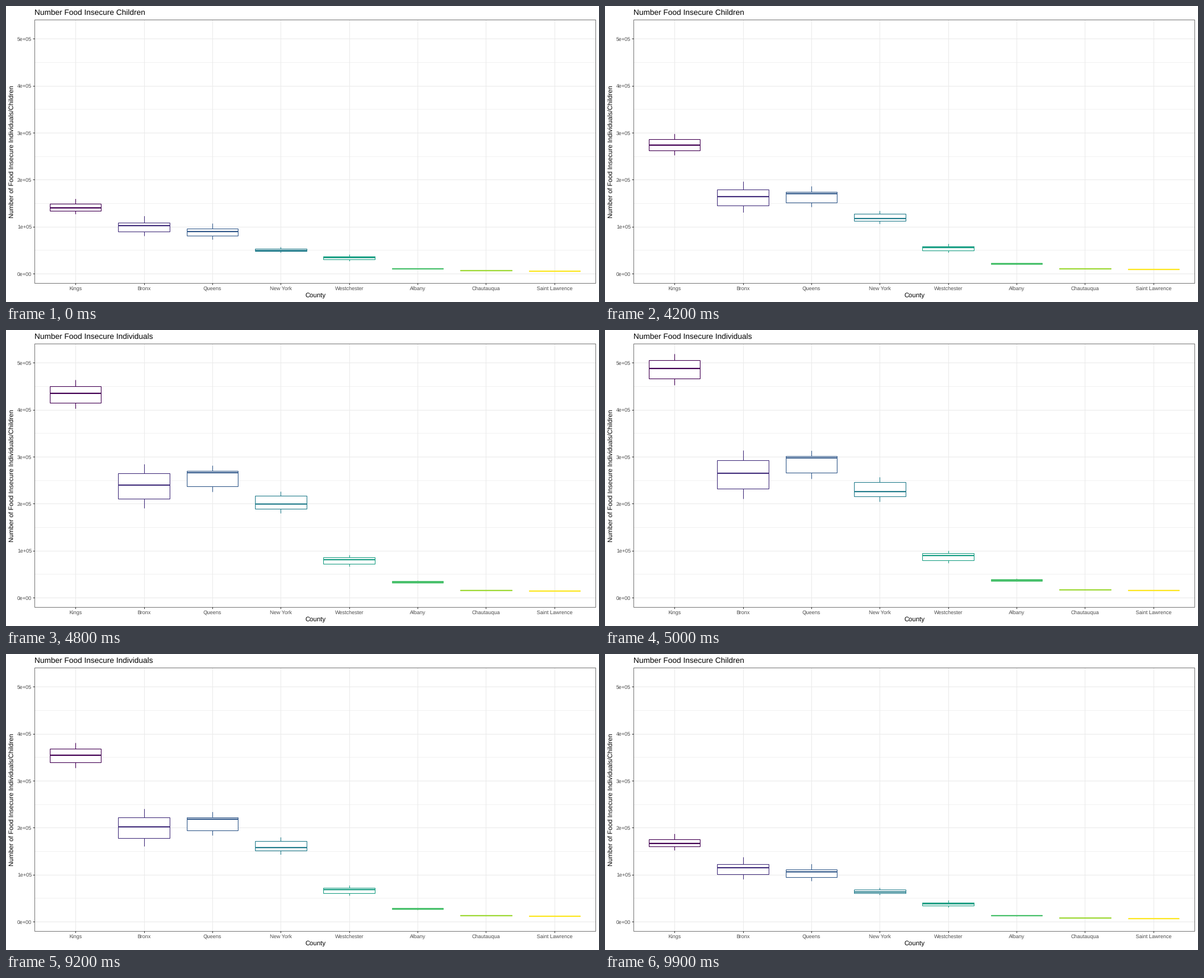
These frames come from a looping animation (1000x500 px, 10 s). A matplotlib script:

```python
import matplotlib.pyplot as plt
import numpy as np
from matplotlib.animation import FuncAnimation
from matplotlib.patches import Rectangle

WIDTH, HEIGHT, DPI = 1000, 500, 100
PX = 72 / DPI  # points per pixel
LEFT, RIGHT, TOP, BOTTOM = 48.4, 994.5, 23.5, 468.5
ZERO_Y, STEP_Y = 452.5, 79.35  # pixel row of 0 and pixels per 1e5
UNIT_X = (RIGHT - LEFT) / 8.2
BOX_HALF = 0.375 * UNIT_X
HOLD, MOVE = 38, 13  # still frames, then steps to the other state
FRAMES = 100
GRID, TICK, TICK_TEXT = "#EBEBEB", "#333333", "#4D4D4D"

# Median children and individuals in units of 1e5, then the box's
# relative reach below the median and above it for individuals
COUNTIES = {
    "Kings": (1.405, 4.883, 0.045, 0.035),
    "Bronx": (1.025, 2.649, 0.125, 0.104),
    "Queens": (0.902, 2.983, 0.110, 0.008),
    "New York": (0.500, 2.265, 0.050, 0.086),
    "Westchester": (0.342, 0.904, 0.125, 0.046),
    "Albany": (0.106, 0.374, 0.04, 0.06),
    "Chautauqua": (0.071, 0.173, 0.04, 0.04),
    "Saint Lawrence": (0.058, 0.158, 0.04, 0.04),
}
COLORS = [plt.cm.viridis(t) for t in np.linspace(0, 1, len(COUNTIES))]

plt.rcParams.update({"font.family": "Liberation Sans", "text.hinting": "none",
                     "path.snap": False})
fig = plt.figure(figsize=(WIDTH / DPI, HEIGHT / DPI), dpi=DPI, facecolor="white")
ax = fig.add_axes([0, 0, 1, 1])
ax.set(xlim=(0, WIDTH), ylim=(HEIGHT, 0))
ax.axis("off")


def row(value):
    return ZERO_Y - value * STEP_Y


def crisp(position):
    """Centre of the pixel that holds this position."""
    return np.floor(position) + 0.5


def summary(median, below, above, upper, lower):
    """Whisker top, box top, median, box bottom and whisker bottom."""
    q1, q3 = median * (1 - below), median * (1 + above)
    spread = q3 - q1
    return np.array([q3 + upper * spread, q3, median, q1, q1 - lower * spread])


def line(xs, ys, color, width, z):
    return ax.plot(xs, ys, color=color, lw=width * PX, zorder=z,
                   solid_capstyle="butt")[0]


def label(x, y, text, size, color="black", ha="center", **kwargs):
    return ax.text(x, y, text, size=size * PX, color=color, ha=ha,
                   va="baseline", **kwargs)


def outline(x0, x1, y0, y1, color, width, fill, z):
    return ax.add_patch(Rectangle((x0, y0), x1 - x0, y1 - y0, ec=color, fc=fill,
                                  lw=width * PX, joinstyle="miter", zorder=z))


for i in range(6):
    y = crisp(row(i))
    line([LEFT, RIGHT], [y, y], GRID, 1.07, 1)
    line([LEFT - 2.75, LEFT], [y, y], TICK, 1.07, 1)
    label(LEFT - 4.95, row(i) + 3.15, f"{i}e+0{5 if i else 0}", 8.8, TICK_TEXT, "right")
    if i < 5:
        line([LEFT, RIGHT], [crisp(row(i + 0.5))] * 2, GRID, 0.6, 1)

boxes = []
for i, (county, color) in enumerate(zip(COUNTIES, COLORS)):
    center = LEFT + UNIT_X * (0.6 + i)
    x, x0, x1 = crisp(np.array([center, center - BOX_HALF, center + BOX_HALF]))
    line([x, x], [TOP, BOTTOM], GRID, 1.07, 1)
    line([x, x], [BOTTOM, BOTTOM + 2.75], TICK, 1.07, 1)
    label(center, 479.7, county, 8.8, TICK_TEXT)

    whiskers = [line([x, x], [0, 0], color, 1.07, 3) for _ in range(2)]
    body = outline(x0, x1, 0, 0, color, 1.07, "white", 4)
    median = line([x0, x1], [0, 0], color, 2.13, 5)
    boxes.append((whiskers, body, median))

outline(crisp(LEFT), RIGHT, TOP, BOTTOM, TICK, 0.65, "none", 6)
label((LEFT + RIGHT) / 2, 492.2, "County", 11)
label(13.4, (TOP + BOTTOM) / 2, "Number of Food Insecure Individuals/Children", 11,
      rotation=90, rotation_mode="anchor")
title = label(LEFT, 15, "", 13.1, ha="left")


def share_of_individuals(frame):
    half, step = divmod(frame, FRAMES // 2)
    moved = max(0, step - HOLD + 1) / MOVE
    return 1 - moved if half else moved


def update(frame):
    share = share_of_individuals(frame)
    group = "Individuals" if share > 0.5 else "Children"
    title.set_text(f"Number Food Insecure {group}")
    for (whiskers, body, median), (few, many, below, above) in zip(
            boxes, COUNTIES.values()):
        children = summary(few, below, 0.055, 0.8, 0.5)
        individuals = summary(many, below, above, 0.35, 0.35)
        rows = row(children + (individuals - children) * share)
        high, q3, mid, q1, low = rows
        whiskers[0].set_ydata([high, q3])
        whiskers[1].set_ydata([q1, low])
        body.set_y(crisp(q3))
        body.set_height(crisp(q1) - crisp(q3))
        median.set_ydata([round(mid)] * 2)
    return []


anim = FuncAnimation(fig, update, frames=FRAMES, interval=100, repeat=True,
                     repeat_delay=0, blit=False)
plt.show()
```
